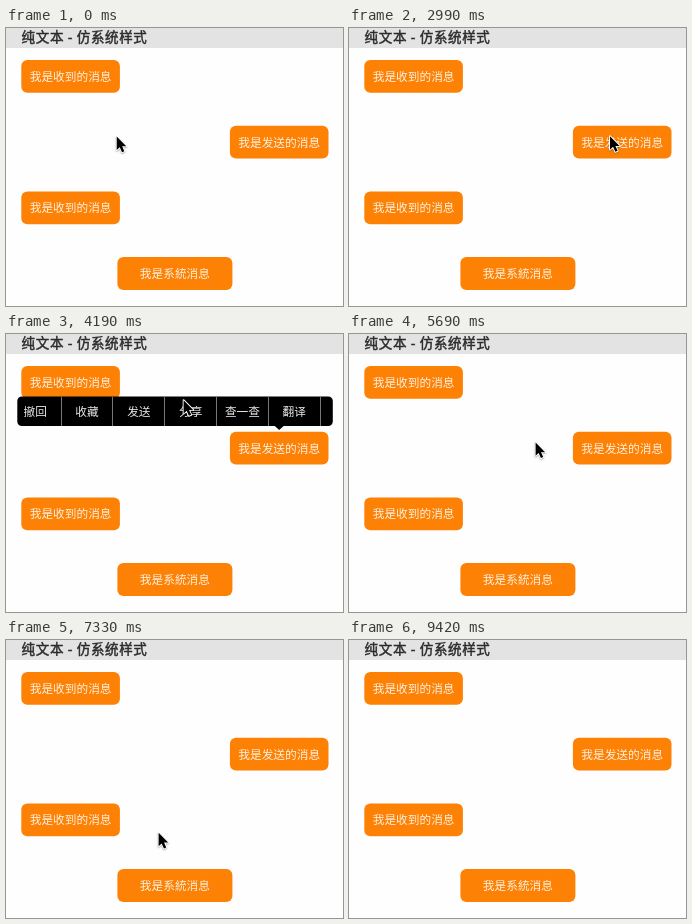
Write an HTML page with a canvas that moves like this. It is 337 by 278 pixels and loops after 9.87 s.

```html
<!DOCTYPE html>
<html lang="zh-CN">
<head>
<meta charset="utf-8">
<title>纯文本</title>
<style>
html, body { margin: 0; width: 100%; height: 100%; overflow: hidden; background: #fefefe; }
canvas { display: block; }
</style>
</head>
<body>
<canvas id="stage" width="337" height="278"></canvas>
<script>
const W = 337, H = 278, LOOP = 9870, STEPS = 66;
const FONT = '"Noto Sans CJK SC", "Noto Sans CJK", "Noto Sans", sans-serif';
const ctx = document.getElementById('stage').getContext('2d');

// side: 0 left, 0.5 centre, 1 right
const bubbles = [
  ['我是收到的消息', 98.6, 0],
  ['我是发送的消息', 98.6, 1],
  ['我是收到的消息', 98.6, 0],
  ['我是系統消息', 115, 0.5]
].map(([text, w, side], i) => ({
  text, w, x: 15.3 + (W - 29.8 - w) * side, y: 32 + i * 65.7
}));

const shortMenu = { texts: ['复制', '添加到收藏夹', '发送给好友'], w: 207.5, scrolls: false };
const longMenu = { texts: ['撤回', '收藏', '发送', '分享', '查一查', '翻译'], w: 315.5, scrolls: true };

// Each menu opens at step "from" and closes at step "to".
const popups = [
  { menu: shortMenu, from: 10, to: 15 },
  { menu: longMenu, from: 22, to: 37 },
  { menu: shortMenu, from: 45, to: 49 },
  { menu: longMenu, from: 53, to: 60 }
];

const pointerStart = { x: 110.7, y: 108.6 }, pointerEnd = 63;
const moves = [
  { from: 2, to: 7, x: 73.3, y: 46 },
  { from: 15, to: 20, x: 261, y: 108.2 },
  { from: 23, to: 28, x: 177.6, y: 66.2 },
  { from: 36, to: 38, x: 186.6, y: 108.4 },
  { from: 38, to: 43, x: 88, y: 189 },
  { from: 44, to: 47, x: 152.6, y: 192.8 },
  { from: 49, to: 52, x: 170, y: 255 },
  { from: 55, to: 59, x: 205, y: 153 }
];

const clamp = v => Math.max(0, Math.min(1, v));
const ease = u => u * u * (3 - 2 * u);

function pointerAt(step) {
  let { x, y } = pointerStart;
  for (const m of moves) {
    const e = ease(clamp((step - m.from) / (m.to - m.from)));
    x += (m.x - x) * e;
    y += (m.y - y) * e;
  }
  return [x, y];
}

function box(x, y, w, h, r, color) {
  ctx.fillStyle = color;
  ctx.beginPath();
  ctx.roundRect(x, y, w, h, r);
  ctx.fill();
}

function polygon(points) {
  ctx.beginPath();
  points.forEach(([x, y]) => ctx.lineTo(x, y));
  ctx.closePath();
}

function label(text, x, y, color) {
  ctx.font = `11.7px ${FONT}`;
  ctx.textAlign = 'center';
  ctx.fillStyle = color;
  ctx.fillText(text, x, y + 4.3);
}

function drawTitle() {
  ctx.fillStyle = '#e3e3e3';
  ctx.fillRect(0, 0, W, 20);
  ctx.font = `13.5px ${FONT}`;
  ctx.letterSpacing = '0.65px';
  ctx.textAlign = 'left';
  ctx.fillStyle = ctx.strokeStyle = '#2b2b2b';
  ctx.lineWidth = 0.45;
  const title = '纯文本 - 仿系统样式';
  ctx.fillText(title, 15.6, 14);
  ctx.strokeText(title, 15.6, 14);
  ctx.letterSpacing = '0px';
}

// A cell is as wide as its text plus padding, but never narrower than 51.8.
const cellWidth = text => Math.max(51.8, text.length * 11.7 + 14);

function drawMenu({ menu, from, to }, bubble, step) {
  if (step < from || step >= to) return;
  const left = 11.3, top = bubble.y - 35.2, h = 29.5;
  const tip = bubble.x + bubble.w / 2;
  const dragged = Math.max(0, step - from - 3);
  ctx.save();
  ctx.globalAlpha = Math.min(1, (step - from + 1) / 3);
  box(left, top, menu.w, h, 4.5, '#000');
  polygon([[tip - 5, top + h - 0.5], [tip + 5, top + h - 0.5], [tip, top + h + 4]]);
  ctx.fill();
  ctx.beginPath();
  ctx.rect(left, top, menu.w, h);
  ctx.clip();
  let x = left - (menu.scrolls ? 11 * (1 - Math.exp(-0.43 * dragged)) : 0);
  for (const text of menu.texts) {
    const w = cellWidth(text);
    label(text, x + w / 2, top + h / 2, '#e8e8e8');
    x += w;
    if (x < left + menu.w - 3) {
      ctx.fillStyle = '#777';
      ctx.fillRect(Math.round(x - 0.5), top, 1, h);
    }
  }
  ctx.restore();
}

function drawPointer(x, y) {
  ctx.save();
  ctx.translate(x, y);
  ctx.scale(0.92, 0.92);
  polygon([[0, 0], [0, 14.6], [3.3, 11.5], [5.8, 17], [8.3, 15.9], [5.9, 10.6], [10.4, 10.6]]);
  ctx.lineJoin = 'round';
  ctx.lineWidth = 2;
  ctx.strokeStyle = '#fff';
  ctx.shadowColor = 'rgba(0,0,0,0.35)';
  ctx.shadowBlur = 1.5;
  ctx.shadowOffsetY = 0.8;
  ctx.stroke();
  ctx.shadowColor = 'transparent';
  ctx.fillStyle = '#000';
  ctx.fill();
  ctx.restore();
}

function draw(time) {
  const step = Math.floor((time % LOOP + 6) / LOOP * STEPS) % STEPS;
  ctx.fillStyle = '#fefefe';
  ctx.fillRect(0, 0, W, H);
  drawTitle();
  for (const b of bubbles) {
    box(b.x, b.y, b.w, 32.8, 6, '#fd8104');
    label(b.text, b.x + b.w / 2, b.y + 16.5, '#fff0e0');
  }
  popups.forEach((p, i) => drawMenu(p, bubbles[i], step));
  if (step < pointerEnd) drawPointer(...pointerAt(step));
}

const start = performance.now();
function tick() {
  draw(performance.now() - start);
  requestAnimationFrame(tick);
}
tick();
</script>
</body>
</html>
```
